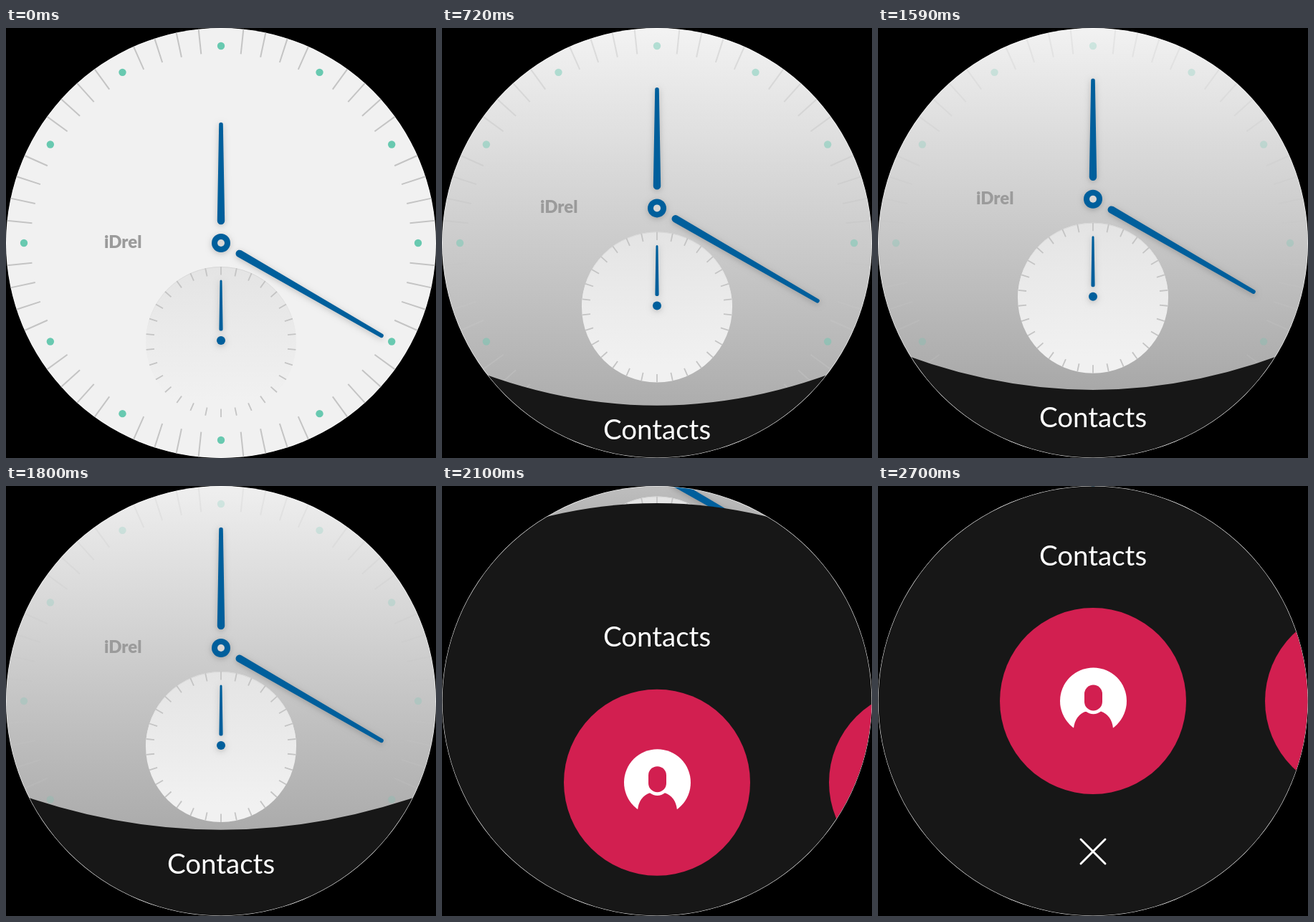
An HTML page with a canvas that plays this animation: 600x600 px, repeating every 4500 ms.

```html
<!DOCTYPE html>
<html lang="en">
<head>
<meta charset="utf-8">
<title>Watch face</title>
<style>
html, body { margin: 0; width: 100%; height: 100%; overflow: hidden; background: #000; }
canvas { display: block; width: 600px; height: 600px; }
</style>
</head>
<body>
<canvas id="stage" width="600" height="600"></canvas>
<script>
const ctx = document.getElementById('stage').getContext('2d');
const TAU = Math.PI * 2;
const LOOP = 4500, STEP = 30, SWIPE = 1620, END = 2700;
const BLUE = '#005f9c', RED = '#d21f50', DARK = '#171717', TICK = '#c4c4c4';

// panel offset, edge height, edge sag, dial lift, tick opacity, top grey, bottom grey
const KEYS = [
  [528, 609, 84, 0, 1, 241, 241],
  [498, 570, 76, 23, .78, 243, 203],
  [463.5, 527, 68, 48.5, .46, 243, 173],
  [446.5, 504.5, 63.5, 61.5, .25, 242, 168],
  [341.5, 342.5, 14.5, 143.5, .04, 223, 185],
  [113, 23, -72, 319, 0, 190, 174],
  [0, -130, -80, 406, 0, 180, 170]
];

function pose(offset) {
  let i = 0;
  while (i < KEYS.length - 2 && offset < KEYS[i + 1][0]) i++;
  const a = KEYS[i], b = KEYS[i + 1];
  const k = (a[0] - offset) / (a[0] - b[0]);
  return a.map((v, j) => v + (b[j] - v) * k);
}

function bezierEase(x1, x2, x) {
  let lo = 0, hi = 1;
  for (let i = 0; i < 24; i++) {
    const s = (lo + hi) / 2, r = 1 - s;
    if (3 * r * r * s * x1 + 3 * r * s * s * x2 + s * s * s < x) lo = s; else hi = s;
  }
  return lo * lo * (3 - 2 * lo);
}

const peek = t => 528 - 82.5 * (1 - Math.pow(1 - t / 3200, 6));

function panelOffset(t) {
  if (t <= SWIPE) return peek(t);
  if (t >= END) return 0;
  return peek(SWIPE) * (1 - bezierEase(.61, .0225, (t - SWIPE) / (END - SWIPE)));
}

function disc(x, y, r, fill) {
  ctx.beginPath();
  ctx.arc(x, y, r, 0, TAU);
  ctx.fillStyle = fill;
  ctx.fill();
}

function line(x1, y1, x2, y2) {
  ctx.beginPath();
  ctx.moveTo(x1, y1);
  ctx.lineTo(x2, y2);
  ctx.stroke();
}

function ticks(cx, cy, count, inner, outer, skip) {
  for (let i = 0; i < count; i++) {
    if (skip && i % skip === 0) continue;
    const a = i / count * TAU, s = Math.sin(a), c = -Math.cos(a);
    line(cx + s * inner, cy + c * inner, cx + s * outer, cy + c * outer);
  }
}

// tapered hand with round ends, measured from its pivot
function hand(cx, cy, turn, from, r1, to, r2) {
  ctx.save();
  ctx.translate(cx, cy);
  ctx.rotate(turn);
  ctx.beginPath();
  ctx.arc(0, -from, r1, 0, Math.PI);
  ctx.arc(0, -to, r2, Math.PI, TAU);
  ctx.closePath();
  ctx.fillStyle = BLUE;
  ctx.fill();
  ctx.restore();
}

function gradient(y1, y2, g1, g2) {
  const g = ctx.createLinearGradient(0, y1, 0, y2);
  const grey = v => `rgb(${v},${v},${v})`;
  g.addColorStop(0, grey(Math.round(g1)));
  g.addColorStop(1, grey(Math.round(g2)));
  return g;
}

function drawFace(edge, fade, top, bottom) {
  disc(300, 300, 300, '#fff');
  disc(300, 300, 299.4, gradient(0, Math.max(edge, 60), top, bottom));
  ctx.globalAlpha = fade;
  ctx.strokeStyle = TICK;
  ctx.lineWidth = 2;
  ticks(300, 300, 60, 265, 300, 5);
  for (let i = 0; i < 12; i++) {
    const a = i / 12 * TAU;
    disc(300 + 275 * Math.sin(a), 300 - 275 * Math.cos(a), 5.2, '#68c9b0');
  }
  ctx.globalAlpha = 1;
}

function drawDial() {
  disc(300, 438, 105, gradient(333, 520, 228, 241));
  ctx.strokeStyle = gradient(333, 440, 215, 238);
  ctx.lineWidth = 1;
  ctx.beginPath();
  ctx.arc(300, 438, 104.5, Math.PI, TAU);
  ctx.stroke();
  ctx.strokeStyle = TICK;
  ctx.lineWidth = 1.8;
  ticks(300, 438, 30, 93.5, 105);

  ctx.font = '900 24px Lato, sans-serif';
  ctx.textAlign = 'left';
  ctx.fillStyle = '#9b9b9b';
  ctx.fillText('iDrel', 137, 307);

  ctx.save();
  ctx.shadowColor = 'rgba(0,0,0,.22)';
  ctx.shadowBlur = 9;
  ctx.shadowOffsetY = 2;
  hand(300, 436, 0, 16, 2.6, 83, 1.5);
  disc(300, 436, 6, BLUE);
  hand(300, 300, 0, 31, 5.2, 165.5, 2.8);
  hand(300, 300, TAU / 3, 29.7, 5.2, 258.5, 2.9);
  disc(300, 300, 13, BLUE);
  ctx.restore();
  disc(300, 300, 5, '#dad7d5');
}

function drawContact() {
  disc(300, 300, 130, RED);
  disc(670, 300, 130, RED);
  disc(300.5, 300, 46.5, '#fff');
  // shoulders with a round neckline
  ctx.fillStyle = RED;
  ctx.beginPath();
  ctx.moveTo(273, 338);
  ctx.quadraticCurveTo(275, 320, 290, 314.5);
  ctx.arc(300.5, 301, 17.2, Math.PI * .71, Math.PI * .29, true);
  ctx.quadraticCurveTo(326, 320, 328, 338);
  ctx.lineTo(328, 352);
  ctx.lineTo(273, 352);
  ctx.fill();
  ctx.beginPath();
  ctx.roundRect(288, 277.5, 25, 36, 12.5);
  ctx.fill();
}

function drawPanel(offset, edge, sag) {
  ctx.beginPath();
  ctx.moveTo(0, edge - sag);
  ctx.quadraticCurveTo(300, edge + sag, 600, edge - sag);
  ctx.lineTo(600, 700);
  ctx.lineTo(0, 700);
  ctx.fillStyle = DARK;
  ctx.fill();

  ctx.translate(0, offset);
  ctx.font = '400 38.5px Lato, sans-serif';
  ctx.textAlign = 'center';
  ctx.fillStyle = '#fff';
  ctx.fillText('Contacts', 300, 110.5);
  drawContact();
  ctx.strokeStyle = '#fff';
  ctx.lineWidth = 3;
  ctx.lineCap = 'round';
  line(283, 493, 317, 527);
  line(317, 493, 283, 527);
}

function clipCircle(r) {
  ctx.beginPath();
  ctx.arc(300, 300, r, 0, TAU);
  ctx.clip();
}

function draw(t) {
  const [offset, edge, sag, lift, fade, top, bottom] = pose(panelOffset(t));
  ctx.fillStyle = '#000';
  ctx.fillRect(0, 0, 600, 600);
  drawFace(edge, fade, top, bottom);

  ctx.save();
  clipCircle(299.4);
  ctx.translate(0, -lift);
  drawDial();
  ctx.restore();

  ctx.save();
  clipCircle(299.4);
  drawPanel(offset, edge, sag);
  ctx.restore();
}

const start = performance.now();
function tick() {
  const t = (performance.now() - start) % LOOP;
  draw(Math.min(END, Math.floor(t / STEP) * STEP));
  requestAnimationFrame(tick);
}
tick();
</script>
</body>
</html>
```
